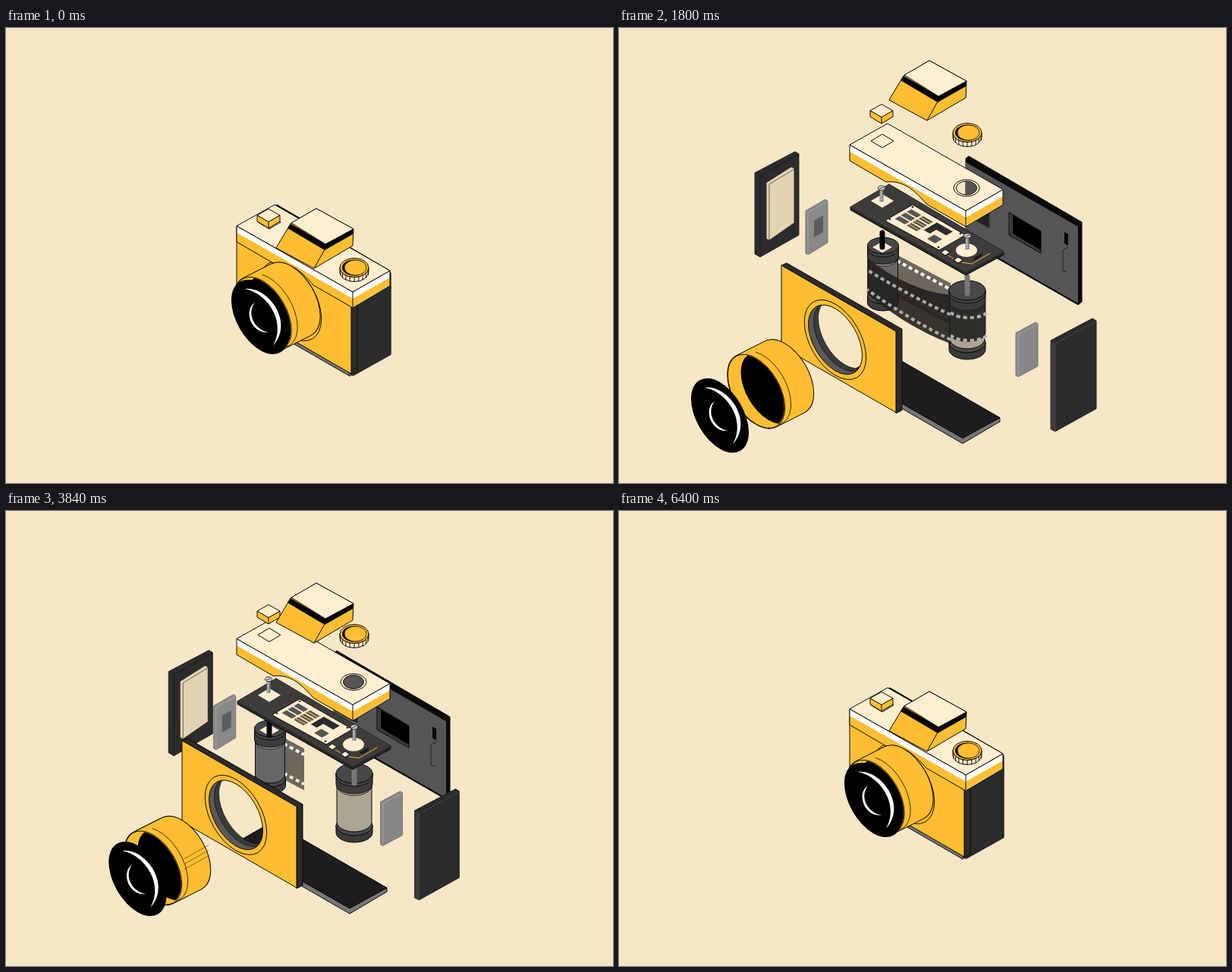
Recreate the animation shown at these times as an HTML page with a canvas. Size 800 by 600 pixels, loop 6440 ms.

```html
<!DOCTYPE html>
<html>
<head>
<meta charset="utf-8">
<style>
html, body { margin: 0; width: 100%; height: 100%; overflow: hidden; background: #f6e7c7; }
canvas { display: block; }
</style>
</head>
<body>
<canvas width="800" height="600"></canvas>
<script>
const c = document.querySelector('canvas').getContext('2d');
const YELLOW = '#ffbe32', CREAM = '#ffeed0', DARK = '#2b2b2b', INK = '#0a0a0a';
const LOOP = 6440, CYCLE = LOOP / 2, STEP = 40;
let now = 0;

// Monotone cubic through [time, value] pairs
function curve(keys, t) {
  const n = keys.length - 1;
  if (t <= keys[0][0]) return keys[0][1];
  if (t >= keys[n][0]) return keys[n][1];
  const i = keys.findIndex(k => k[0] > t) - 1;
  const slope = j => (keys[j + 1][1] - keys[j][1]) / (keys[j + 1][0] - keys[j][0]);
  const tangent = j => {
    if (j < 1 || j >= n) return 0;
    const a = slope(j - 1), b = slope(j);
    return a * b <= 0 ? 0 : 2 * a * b / (a + b);
  };
  const h = keys[i + 1][0] - keys[i][0], u = (t - keys[i][0]) / h, v = 1 - u;
  return v * v * (1 + 2 * u) * keys[i][1] + u * u * (3 - 2 * u) * keys[i + 1][1]
    + h * u * v * (v * tangent(i) - u * tangent(i + 1));
}

const SIDE = { peak: 1.05, late: [.79, .56, .24, .06] };
const LENS = { peak: 1.035, late: [.861, .678, .32, .07] };
const TOP = { peak: 1, late: [.995, .96, .52, .08] };

function spread(a, b, { peak, late }) {
  return curve([[0, 0], [180, a * .26], [480, a], [620, b], [680, b + (1 - b) * .45], [860, .98],
    [1350, peak], [1550, peak], [1800, 1], [2040, late[0]], [2220, late[1]],
    [2500, late[2]], [2720, late[3]], [2820, 0]], now);
}

// Draws a part in its open place, moved by (dx, dy) when closed
function part(dx, dy, a, b, group, draw) {
  const q = 1 - spread(a, b, group);
  c.save();
  c.translate(dx * q, dy * q);
  draw(q);
  c.restore();
}

function paint(fill, stroke, width = 1) {
  if (fill) { c.fillStyle = fill; c.fill('evenodd'); }
  if (stroke) { c.strokeStyle = stroke; c.lineWidth = width; c.lineJoin = 'round'; c.stroke(); }
}
function trace(p) {
  for (let i = 0; i < p.length; i += 2) c.lineTo(p[i], p[i + 1]);
  c.closePath();
}
function poly(p, fill, stroke, width) {
  c.beginPath();
  trace(p);
  paint(fill, stroke, width);
}
function line(p, color, width = 1) {
  c.beginPath();
  for (let i = 0; i < p.length; i += 2) c.lineTo(p[i], p[i + 1]);
  paint(null, color, width);
}
function oval(x, y, rx, ry, fill, stroke, width) {
  c.beginPath();
  c.ellipse(x, y, rx, ry, 0, 0, 7);
  paint(fill, stroke, width);
}
function diamond(x, y, w, h, fill, stroke) {
  poly([x - w, y, x, y - h, x + w, y, x, y + h], fill, stroke);
}
// Circle lying in the front plane
function ring(x, y, r, from = 0, to = Math.PI * 2) {
  c.save();
  c.transform(.866, .5, 0, 1, x, y);
  c.moveTo(r * Math.cos(from), r * Math.sin(from));
  c.arc(0, 0, r, from, to);
  c.restore();
}
function disc(x, y, r, fill, stroke, width) {
  c.beginPath();
  ring(x, y, r);
  paint(fill, stroke, width);
}

function backPlate() {
  poly([457, 172, 461, 169, 610, 256, 610, 361, 605, 365, 457, 280], INK, INK);
  poly([457, 177, 605, 262, 605, 363, 457, 278], '#555');
  poly([472, 235, 488, 244, 488, 264, 472, 255], '#222', '#333');
  poly([514, 243, 556, 268, 556, 297, 514, 273], '#3a3a3a', INK);
  poly([519, 247, 556, 268, 556, 293, 519, 271], '#000');
  poly([587, 269, 592, 272, 592, 287, 587, 284], '#000');
  line([592, 289, 585, 293, 585, 320, 590, 321], '#222');
}
function leftPanel() {
  poly([179, 191, 232, 163, 237, 166, 237, 273, 186, 302, 179, 298], DARK, '#222');
  line([186, 301, 186, 195, 237, 167], '#1c1c1c');
  poly([194, 204, 227, 183, 231, 185, 231, 257, 198, 280, 194, 278], '#e2d3b3', '#333');
  line([198, 280, 198, 206, 231, 186], '#4d483d', .8);
}
function innerPanel() {
  poly([246, 241, 272, 226, 275, 228, 275, 283, 249, 299, 246, 297], '#898989', '#777');
  line([249, 298, 249, 243, 275, 229], '#a5a5a5');
  poly([257, 254, 269, 247, 269, 269, 257, 276], '#5c5c5c');
}
function base() {
  poly([302, 455, 351, 427, 502, 514, 502, 519, 453, 548, 302, 461], '#777', INK);
  poly([302, 455, 351, 427, 502, 514, 453, 541], '#1d1d1d', INK);
}

// Portion of the film between two edge curves, given as functions of x
function film(x0, x1, end, top, bottom, fill, rows) {
  const x = x0 + (x1 - x0) * end, step = (x - x0) / 20, edge = [];
  if (Math.abs(x - x0) < 1) return;
  for (let i = 0; i <= 20; i++) edge.push(x0 + step * i, top(x0 + step * i));
  for (let i = 20; i >= 0; i--) edge.push(x0 + step * i, bottom(x0 + step * i));
  poly(edge, fill);
  c.setLineDash([5, 4]);
  for (const [row, color] of rows) {
    const p = [];
    for (let i = 0; i <= 20; i++) p.push(x0 + step * i, row(x0 + step * i));
    line(p, color, 4);
  }
  c.setLineDash([]);
}
const sag = (y0, y1, bend) => x => {
  const u = (x - 327) / 110;
  return y0 + (y1 - y0) * u + bend * u * (1 - u);
};

function spool(x, top, bottom, rx, ry, body) {
  const barrel = (y0, y1, r, fill) => {
    c.beginPath();
    c.ellipse(x, y1, r, ry, 0, 0, Math.PI);
    c.ellipse(x, y0, r, ry, 0, Math.PI, 0, true);
    c.closePath();
    paint(fill, INK);
  };
  barrel(bottom - 9, bottom, rx, '#3a3a3a');
  oval(x, bottom - 9, rx, ry, '#484848', INK);
  barrel(top + 16, bottom - 14, rx - 1, body);
  barrel(top, top + 14, rx, '#3c3c3c');
  barrel(top, top + 4, rx, '#444');
  oval(x, top, rx, ry, '#484848', INK);
}
function pin(x, top, bottom, color) {
  c.lineCap = 'round';
  line([x, top + 3, x, bottom], color, 7);
  c.lineCap = 'butt';
}

function filmAndSpools() {
  const out = curve([[400, 0], [480, .1], [620, .26], [900, 1], [2000, 1], [2400, 0]], now);
  const wrap = curve([[750, 0], [1200, 1], [1900, 1], [2250, 0]], now);
  const slope = y => x => y + (x - 368) * .53;
  film(366, 437, Math.min(1, out + .12), slope(300), slope(355), '#6d675b',
    [[slope(308), '#fff'], [slope(347), '#eee']]);
  spool(348, 287, 362, 20.5, 11, '#666');
  diamond(347, 289, 14, 8, CREAM, '#333');
  part(0, 18, .55, .62, TOP, () => pin(347, 267, 289, INK));
  spool(459, 346, 424, 24, 13, '#ada594');
  part(0, 30, .5, .7, TOP, () => pin(459, 325, 350, '#777'));
  if (wrap > 0) {
    c.save();
    c.globalAlpha = Math.min(1, wrap * 3) * .93;
    c.beginPath();
    c.ellipse(459, 402, 24.5, 12, 0, 0, Math.PI);
    c.ellipse(459, 360, 24.5, 12, 0, Math.PI, 0, true);
    paint('#262524');
    c.setLineDash([5, 4]);
    for (const y of [372, 402]) {
      c.beginPath();
      c.ellipse(461, y, 25, 10, 0, Math.PI * .9, .1, true);
      paint(null, '#bbb', 4);
    }
    c.restore();
    film(437, 327, wrap, sag(303, 352, 38), sag(350, 416, 26), 'rgba(35,33,31,.9)',
      [[sag(319, 378, 8), '#aaa'], [sag(345, 411, 12), '#aaa']]);
  }
}

function board() {
  poly([305, 236, 356, 206, 507, 295, 507, 299, 457, 326, 305, 240], '#262626', INK);
  poly([305, 236, 356, 206, 507, 295, 457, 322], '#3d3c3b');
  diamond(347, 228, 15, 9, CREAM);
  poly([352, 253, 387, 233, 455, 272, 455, 274, 422, 293, 352, 255], CREAM, INK);
  c.save();
  c.transform(.866, .5, -.866, .5, 387, 233);
  c.fillStyle = '#555';
  for (const x of [5, 23]) for (let y = 7; y < 34; y += 9) c.fillRect(x, y, 15, 7);
  c.fillStyle = YELLOW;
  for (let y = 10; y < 34; y += 9) c.fillRect(20, y, 18, 1.2);
  c.fillStyle = DARK;
  c.fillRect(42, 5, 24, 10);
  c.fillRect(42, 12, 9, 13);
  c.fillStyle = '#555';
  c.fillRect(56, 23, 12, 11);
  c.restore();
  for (const [x, y] of [[357, 252], [387, 236], [421, 289], [450, 271]]) oval(x, y, 1.5, 1, INK);
  oval(458, 293, 14, 9, CREAM);
  poly([466, 304, 478, 297, 478, 301, 470, 306], '#1b1b1b');
  diamond(430, 296, 6, 4, CREAM, INK);
  diamond(447, 306, 6, 4, CREAM, INK);
  line([434, 300, 441, 304], YELLOW);
  line([452, 309, 465, 311, 489, 297], YELLOW);
}
function screw(x, y) {
  line([x, y, x, y + 18], '#777', 5);
  line([x - .5, y, x - .5, y + 17], '#bbb', 2);
  oval(x, y, 4.5, 3, '#ddd', '#333');
  line([x - 3, y + 1, x + 3, y - 1], '#333');
}
function smallPanel() {
  poly([523, 402, 549, 388, 552, 390, 552, 446, 526, 460, 523, 458], '#888', '#777');
  line([526, 459, 526, 404, 552, 391], '#a5a5a5');
}
function rightPanel(q) {
  c.translate(569, 383);
  c.scale(1 - .08 * q, 1 - .07 * q);
  c.translate(-569, -383);
  poly([569, 412, 624, 383, 629, 386, 629, 502, 575, 532, 569, 529], DARK, '#222');
  poly([569, 413, 575, 416, 575, 532, 569, 529], '#3b3b3b');
  line([575, 531, 575, 416, 629, 387], '#4d4d4b', .8);
}
function frontPlate() {
  poly([214, 313, 221, 310, 373, 397, 373, 504, 365, 508, 365, 400], DARK, INK);
  c.save();
  c.beginPath();
  ring(285, 411, 41);
  c.clip();
  for (const [d, color] of [[13, '#3a3a3a'], [7, '#595959']]) {
    c.beginPath();
    c.rect(200, 300, 200, 220);
    ring(285 + d, 411 - d * .6, 41);
    paint(color, INK, .7);
  }
  c.restore();
  c.beginPath();
  trace([214, 313, 365, 400, 365, 507, 214, 420]);
  ring(285, 411, 41);
  paint(YELLOW, INK);
  disc(285, 411, 47, null, INK);
}
function cover() {
  const band = (y, fill) => {
    c.beginPath();
    trace([304, 154 + y, 457, 241 + y, 506, 213 + y, 506, 232, 457, 261, 405, 233]);
    paint(fill);
  };
  const side = () => {
    c.beginPath();
    c.moveTo(304, 154);
    c.lineTo(304, 175);
    c.lineTo(352, 203);
    c.bezierCurveTo(374, 201, 388, 212, 405, 232);
    c.lineTo(457, 262);
    c.lineTo(506, 233);
    c.lineTo(506, 213);
    c.lineTo(457, 241);
    c.closePath();
  };
  c.save();
  side();
  c.clip();
  c.fillStyle = '#fff';
  c.fillRect(300, 140, 210, 125);
  band(9, YELLOW);
  poly([304, 163, 457, 250, 457, 262, 304, 176], YELLOW);
  c.restore();
  side();
  paint(null, INK);
  line([457, 241, 457, 262], INK);
  c.beginPath();
  trace([354, 126, 506, 213, 457, 241, 304, 154]);
  c.moveTo(471.5, 211);
  c.ellipse(458, 211, 13.5, 9, 0, 0, Math.PI * 2);
  paint(CREAM, INK);
  oval(458, 211, 17, 11, null, INK);
  diamond(347, 149, 15, 9, null, INK);
}
function button() {
  poly([331, 109, 346, 117, 361, 109, 361, 117, 346, 126, 331, 117], YELLOW, INK);
  diamond(346, 109, 15, 8.5, CREAM, INK);
  line([346, 117, 346, 126], INK);
}
function prism() {
  poly([375, 63, 409, 43, 458, 70, 457, 92, 406, 122, 356, 95], YELLOW, INK);
  poly([375, 63, 421, 90, 458, 70, 457, 77, 420, 98, 371, 69], '#000');
  line([420, 97, 406, 122], INK);
  poly([376, 62, 409, 43, 458, 70, 421, 90], CREAM, INK);
}
function dial() {
  c.beginPath();
  c.ellipse(459, 144, 19, 12.5, 0, 0, Math.PI);
  c.ellipse(459, 138, 19, 12.5, 0, Math.PI, 0, true);
  c.closePath();
  paint(CREAM, INK);
  for (let i = 1; i < 10; i++) {
    const a = Math.PI * i / 10, x = 459 + 19 * Math.cos(a), y = 138 + 12.5 * Math.sin(a);
    line([x, y, x, y + 6], INK);
  }
  oval(459, 138, 19, 12.5, YELLOW, INK);
  oval(459, 138, 16, 10.5, '#000');
  oval(460.5, 138, 14.5, 10, YELLOW, INK, .7);
}
function barrel() {
  const r = 43.5, n = .93 * Math.PI;
  // Silhouette: the front disc swept back along the lens axis
  for (const width of [2, 0]) {
    for (let i = 0; i <= 38; i++) {
      disc(218.5 - i * .987, 460 + i * .5, r, width ? INK : YELLOW, width && INK, width);
    }
  }
  c.beginPath();
  ring(189, 474.7, r, -n * .62, n * .42);
  paint(null, INK, .8);
  const lines = curve([[300, 0], [420, 1], [640, 1], [800, 0]], now);
  if (lines > 0) {
    c.save();
    c.globalAlpha = lines;
    for (let i = 0; i < 3; i++) line([222, 467 + i * 7, 254, 449 + i * 7], '#7a5200', .8);
    c.restore();
  }
  disc(181, 479, r, YELLOW, INK);
  c.save();
  c.beginPath();
  ring(181, 479, r - 1);
  c.clip();
  disc(197, 475, 42, '#000');
  c.restore();
}
function cap() {
  disc(133, 511, 43.9, '#000');
  c.beginPath();
  c.moveTo(113, 474);
  c.bezierCurveTo(142, 470, 179, 517, 150, 549);
  c.bezierCurveTo(168, 518, 143, 480, 113, 474);
  c.moveTo(126, 492);
  c.bezierCurveTo(110, 503, 122, 534, 144, 531);
  c.bezierCurveTo(127, 529, 114, 508, 126, 492);
  paint('#fff');
}

function draw(time) {
  now = Math.floor(time % LOOP / STEP) * STEP % CYCLE;
  c.fillStyle = '#f6e7c7';
  c.fillRect(0, 0, 800, 600);
  part(-104, 64, .577, .76, SIDE, backPlate);
  part(126, 74, .543, .72, SIDE, leftPanel);
  part(75, 43, .45, .63, SIDE, innerPanel);
  part(0, -89, .63, .81, SIDE, base);
  filmAndSpools();
  part(0, 45, .49, .67, TOP, board);
  part(0, 60, .5, .82, TOP, () => {
    screw(346, 211);
    screw(459, 274);
  });
  part(-75, -47, .487, .607, SIDE, smallPanel);
  part(-117, -63, .51, .74, SIDE, rightPanel);
  part(90, -51, .622, .8, LENS, frontPlate);
  part(0, 107, .54, .865, TOP, cover);
  part(0, 138, .594, .833, TOP, button);
  part(0, 195, .451, .733, TOP, prism);
  part(0, 178, .685, .865, TOP, dial);
  part(157.5, -102, .784, .917, LENS, barrel);
  part(202, -130, .611, .8, LENS, cap);
}

let start;
function tick(time) {
  start ??= time;
  draw(time - start);
  requestAnimationFrame(tick);
}
draw(0);
requestAnimationFrame(tick);
</script>
</body>
</html>
```
